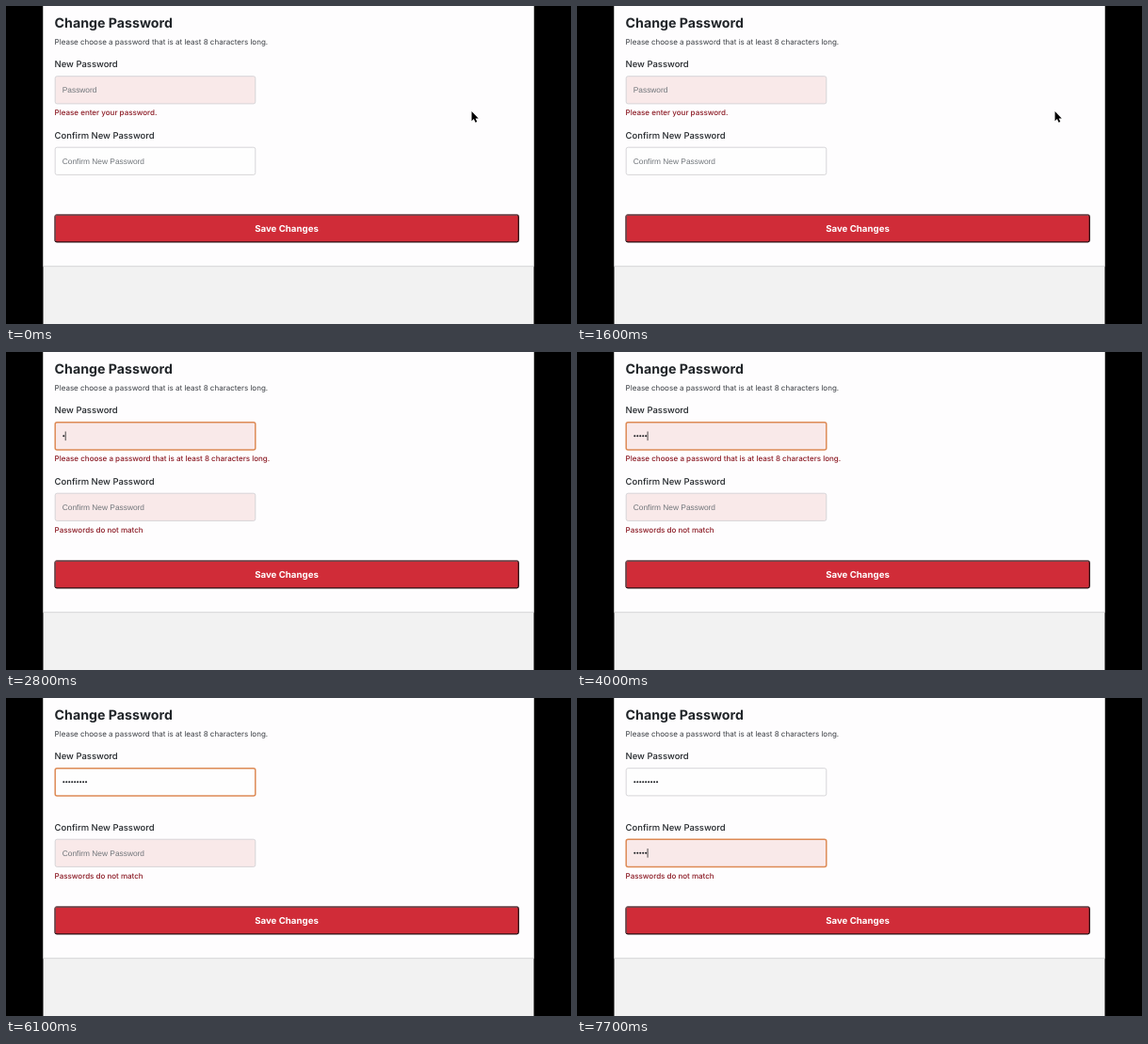
Recreate the animation shown at these times as an HTML page. Size 600 by 338 pixels, loop 8 s.

```html
<!DOCTYPE html>
<html lang="en">
<head>
<meta charset="utf-8">
<title>Change Password</title>
<style>
  html, body { margin: 0; width: 100%; height: 100%; overflow: hidden; background: #000; }
  svg { display: block; width: 100%; height: 100%; }
  text { font-family: Inter, sans-serif; text-rendering: geometricPrecision; fill: #212529; }
  .title { font-size: 14.2px; font-weight: 700; }
  .hint { font-size: 8px; fill: #3a3e43; }
  .label { font-size: 9.45px; font-weight: 500; }
  .error { font-size: 8px; font-weight: 500; fill: #8b1a24; }
  .ghost { font-family: "Liberation Sans", Arial, sans-serif; font-size: 8.35px; fill: #70757a; }
  .save { font-size: 9.7px; font-weight: 700; fill: #fff; text-anchor: middle; }
</style>
</head>
<body>
<svg viewBox="0 0 600 338">
  <rect width="600" height="338" fill="#000"/>
  <rect x="39.5" width="521" height="338" fill="#f2f2f2"/>
  <rect x="39.5" width="521" height="276.5" fill="#fefdfe"/>
  <rect x="39.5" y="276.2" width="521" height="1" fill="#d6d6d7"/>

  <text class="title" x="51.6" y="23.2">Change Password</text>
  <text class="hint" x="51.6" y="41">Please choose a password that is at least 8 characters long.</text>
  <text class="label" x="51.6" y="65.3">New Password</text>
  <text class="label" x="51.6" y="140.8">Confirm New Password</text>

  <g id="fields"></g>

  <rect x="52.1" y="222.1" width="492.2" height="28.8" rx="1.8" fill="#d02c38" stroke="#2b0f13" stroke-width="1.3"/>
  <path d="M52.1 250V223.9Q52.1 222.1 53.9 222.1H543.5" fill="none" stroke="#7d5156" stroke-width="1.3"/>
  <text class="save" x="298" y="240.4">Save Changes</text>

  <path id="arrow" d="M0 0V10.2L2.3 8L4 11.8L5.7 11L4.1 7.4H7.2Z" fill="#000" stroke="#fff" stroke-width=".8" paint-order="stroke"/>
  <g id="beam" fill="none" stroke-linecap="round">
    <path d="M-2.3 -5.4Q0 -5.4 0 -4Q0 -5.4 2.3 -5.4M0 -4V4M-2.3 5.4Q0 5.4 0 4Q0 5.4 2.3 5.4" stroke="#fff" stroke-width="2"/>
    <path d="M-2.3 -5.4Q0 -5.4 0 -4Q0 -5.4 2.3 -5.4M0 -4V4M-2.3 5.4Q0 5.4 0 4Q0 5.4 2.3 5.4" stroke="#222" stroke-width="1"/>
  </g>
</svg>
<script>
const LOOP = 8000, BLINK = 530, DOT = 2.97;
const FOCUS = 2400, TAB = 6300;
const keys1 = [2700, 3000, 3200, 3500, 3900, 4400, 4700, 5000, 5400];
const keys2 = [6700, 7000, 7200, 7400, 7600];
// Pointer route: time, x, y
const route = [
  [0, 494.5, 112], [430, 494.5, 112], [700, 456, 88], [1000, 424, 33.5],
  [1150, 474, 10], [1300, 527, 57], [1450, 541, 88], [1650, 486, 116],
  [1900, 310, 108], [2100, 215, 91], [2250, 193, 87], [8000, 193, 87]
];

const $ = id => document.getElementById(id);

function make(tag, attrs, parent) {
  const el = document.createElementNS("http://www.w3.org/2000/svg", tag);
  for (const k in attrs) el.setAttribute(k, attrs[k]);
  return parent.appendChild(el);
}

function show(el, on) {
  el.setAttribute("visibility", on ? "visible" : "hidden");
}

function makeField(y, ghost, max) {
  const g = $("fields");
  const box = make("rect", { rx: 2 }, g);
  const hint = make("text", { class: "ghost", x: 59.8, y: y + 17.8 }, g);
  hint.textContent = ghost;
  const dots = Array.from({ length: max }, (_, i) =>
    make("circle", { cx: 61.3 + i * DOT, cy: y + 14.8, r: 1.05, fill: "#1d2024" }, g));
  const caret = make("rect", { y: y + 10, width: 0.8, height: 9.6, fill: "#222" }, g);
  const error = make("text", { class: "error", x: 51.6, y: y + 41.8 }, g);
  return { y, box, hint, dots, caret, error };
}

function drawField(f, { count, focused, bad, message, since }) {
  const set = (k, v) => f.box.setAttribute(k, v);
  set("x", 52.2);
  set("y", f.y + 0.2);
  set("width", 212.6);
  set("height", 29.2);
  set("fill", bad ? "#f9e9e9" : "#fefefe");
  set("stroke", focused ? "#dd8a55" : "#d3d2d5");
  set("stroke-width", focused ? 1.5 : 0.9);
  show(f.hint, count === 0);
  f.dots.forEach((d, i) => show(d, i < count));
  f.caret.setAttribute("x", 59.8 + count * DOT);
  show(f.caret, focused && Math.floor(since / BLINK) % 2 === 0);
  f.error.textContent = message;
}

const first = makeField(74.5, "Password", keys1.length);
const second = makeField(150, "Confirm New Password", keys2.length);

const slope = (i, k) => {
  const a = route[Math.max(i - 1, 0)], b = route[Math.min(i + 1, route.length - 1)];
  return i < 2 || i > route.length - 3 ? 0 : (b[k] - a[k]) / (b[0] - a[0]);
};

function pointer(t) {
  let i = 0;
  while (i < route.length - 2 && route[i + 1][0] <= t) i++;
  const a = route[i], b = route[i + 1], d = b[0] - a[0], u = (t - a[0]) / d;
  const s = u * u * (3 - 2 * u);
  return [1, 2].map(k =>
    a[k] + (b[k] - a[k]) * s
    + d * slope(i, k) * u * (1 - u) * (1 - u)
    - d * slope(i + 1, k) * u * u * (1 - u));
}

function draw(t) {
  const typed = keys => keys.filter(k => k <= t).length;
  const n1 = typed(keys1), n2 = typed(keys2);
  const short = n1 < 8;

  drawField(first, {
    count: n1,
    focused: t >= FOCUS && t < TAB,
    bad: short,
    message: n1 === 0 ? "Please enter your password."
      : short ? "Please choose a password that is at least 8 characters long." : "",
    since: t - (keys1[n1 - 1] || FOCUS)
  });
  drawField(second, {
    count: n2,
    focused: t >= TAB,
    bad: n1 > 0,
    message: n1 > 0 ? "Passwords do not match" : "",
    since: t - (keys2[n2 - 1] || TAB)
  });

  const [x, y] = pointer(t);
  const over = x > 52 && x < 265 && y > 74 && y < 104;
  const idle = t < keys1[0];
  for (const id of ["arrow", "beam"]) $(id).setAttribute("transform", `translate(${x} ${y})`);
  show($("arrow"), idle && !over);
  show($("beam"), idle && over);
}

function tick() {
  draw(performance.now() % LOOP);
  requestAnimationFrame(tick);
}
tick();
</script>
</body>
</html>
```
